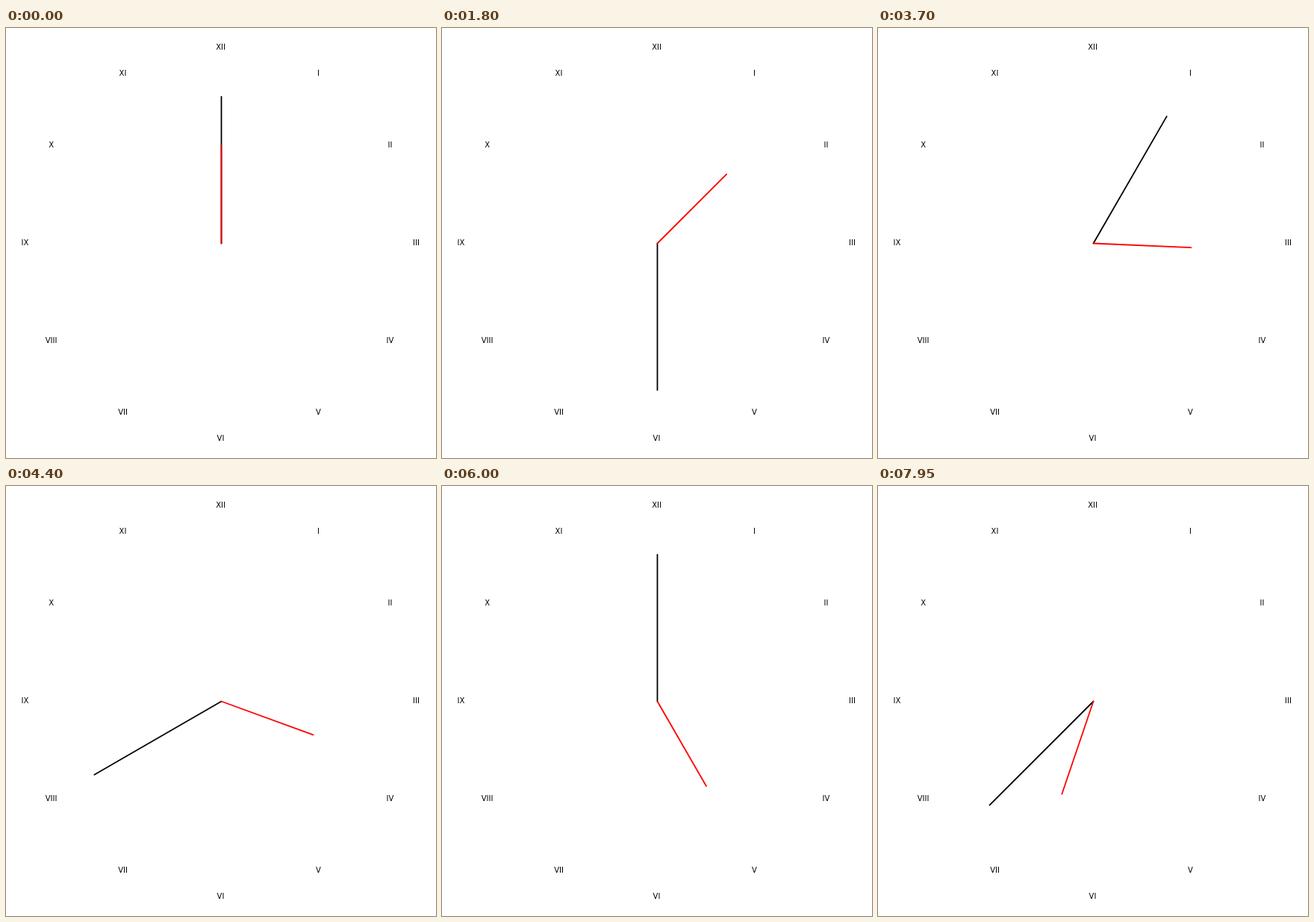
Write an HTML page with a canvas that moves like this. It is 576x576 px and loops after 8 s.

```html
<!DOCTYPE html>
<html lang="en">
<head>
<meta charset="utf-8">
<title>Clock</title>
<style>
html, body { margin: 0; width: 100%; height: 100%; overflow: hidden; background: #fff; }
canvas { display: block; }
</style>
</head>
<body>
<canvas id="clock" width="576" height="576"></canvas>
<script>
const ctx = document.getElementById('clock').getContext('2d', { alpha: false });
const NUMERALS = ['XII', 'I', 'II', 'III', 'IV', 'V', 'VI', 'VII', 'VIII', 'IX', 'X', 'XI'];
const SIZE = 576, LOOP = 8000, STEP = 50;
const HUB = 288.5, DIAL = 287.5, UNIT = 131;
const rad = deg => deg * Math.PI / 180;

function drawNumerals() {
  ctx.font = '10px "DejaVu Sans", Verdana, sans-serif';
  ctx.textAlign = 'center';
  ctx.textBaseline = 'alphabetic';
  ctx.fillStyle = '#000';
  NUMERALS.forEach((label, i) => {
    const a = rad(i * 30);
    const x = DIAL + 2 * UNIT * Math.sin(a);
    const y = DIAL - 2 * UNIT * Math.cos(a);
    ctx.fillText(label, x, Math.round(y + 3.5));
  });
}

function drawHand(deg, length, color) {
  const a = rad(deg);
  ctx.strokeStyle = color;
  ctx.lineWidth = 1.8;
  ctx.lineCap = 'round';
  ctx.beginPath();
  ctx.moveTo(HUB, HUB);
  ctx.lineTo(HUB + length * Math.sin(a), HUB - length * Math.cos(a));
  ctx.stroke();
}

// The hands jump every 50 ms; 24 ticks make an hour.
function draw(now) {
  const tick = Math.floor((now % LOOP) / STEP);
  ctx.fillStyle = '#fff';
  ctx.fillRect(0, 0, SIZE, SIZE);
  drawNumerals();
  drawHand(tick * 15, 1.5 * UNIT, '#000');
  drawHand(tick * 1.25, UNIT, '#f00');
}

let start;
function loop(now) {
  start ??= now;
  draw(Math.max(0, now - start));
  requestAnimationFrame(loop);
}
draw(0);
requestAnimationFrame(loop);
</script>
</body>
</html>
```
